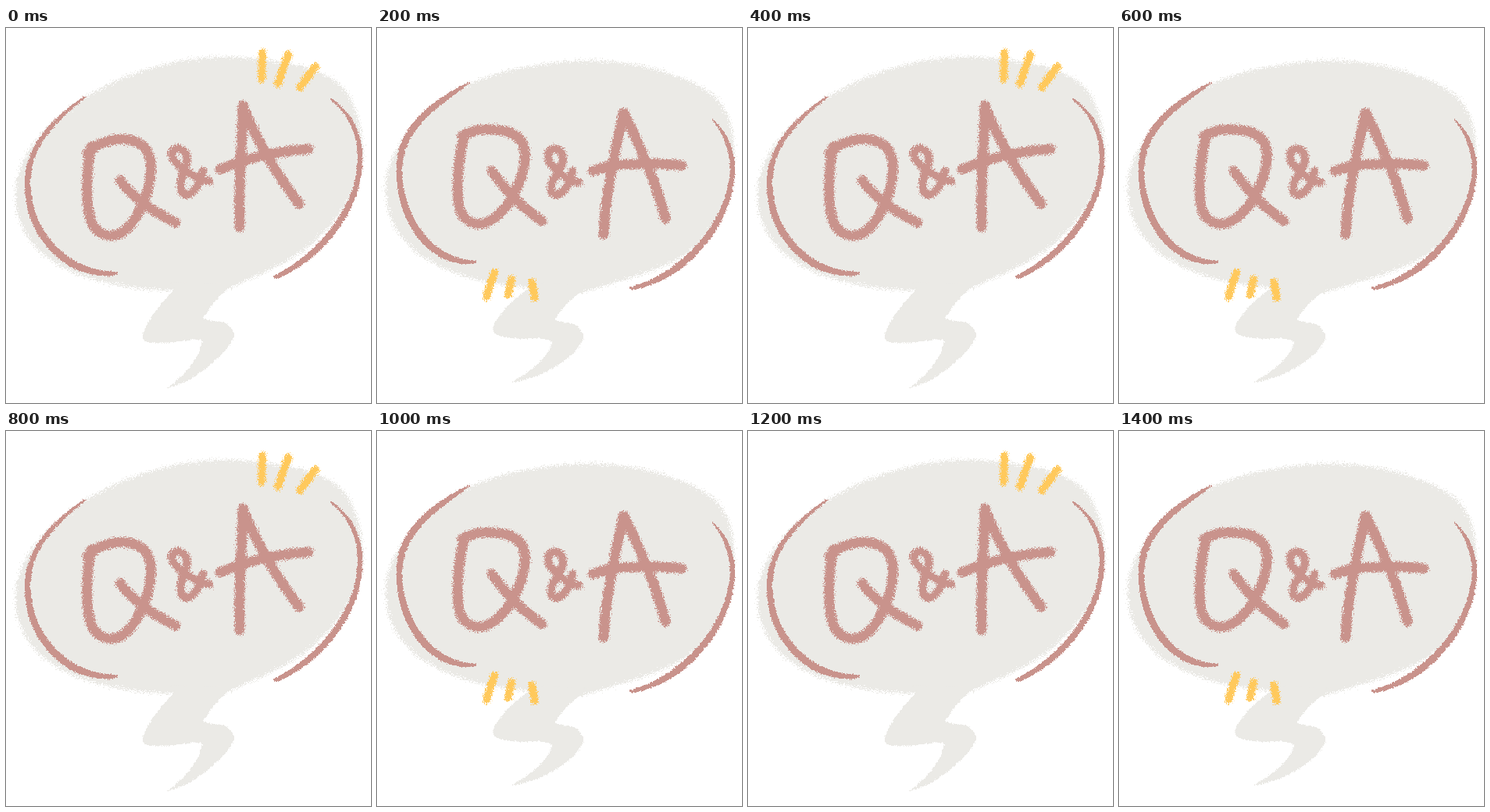
An HTML page for the animation above (1600 ms loop, 467 px wide and 480 px high).

```html
<!DOCTYPE html>
<html lang="en">
<head>
<meta charset="utf-8">
<title>Q&amp;A</title>
<style>
html, body { margin: 0; width: 100%; height: 100%; overflow: hidden; background: #fff; }
svg { display: block; width: 100%; height: 100%; }
.paper { fill: #ebeae6; }
.ink, .arc, .spark { fill: none; stroke: #c9938c; stroke-linecap: round; stroke-linejoin: round; }
.ink { stroke-width: 13; }
.amp { stroke-width: 10.5; }
.arc { fill: #c9938c; stroke-width: 2.6; }
.spark { stroke: #ffc95c; stroke-width: 10; }
.paper.body { filter: url(#ragged); }
.tail { filter: url(#crisp); }
.ink, .spark { filter: url(#chalk); }
.arc { filter: url(#crisp); }
</style>
</head>
<body>
<svg viewBox="0 0 467 480" role="img" aria-label="Q&amp;A">
  <defs id="defs"></defs>
  <g id="tiltUp">
    <path class="paper body" d="M12 215C12 165 48 123 100 90C148 58 218 37 280 37C345 38 413 50 435 81C447 98 455 125 457 155C457 198 432 241 390 278C358 303 322 316 288 332L215 336C155 335 95 324 54 295C23 270 12 244 12 215Z"/>
    <path class="paper tail" d="M210 325L296 327C276 337 264 353 252 371C262 378 272 373 281 378C287 382 292 387 292 393C288 407 275 419 262 430C246 445 227 455 205 462C230 444 248 422 251 401C249 396 239 400 228 400C210 403 186 406 177 400C171 394 180 379 187 369C195 356 205 345 216 335Z"/>
    <path class="arc" d="M101 88C60 116 25 150 25 200C25 262 70 320 137 316L142 313C80 314 31 262 30 200C29 152 62 120 101 88Z"/>
    <path class="arc" d="M416 91C442 110 456 135 455 170C453 235 404 296 346 320L343 318C400 291 449 229 451 170C452 135 440 111 416 91Z"/>
    <path class="ink" d="M104 161C120 143 146 139 164 145C181 150 187 166 185 185C183 213 169 246 151 260C135 272 117 265 109 248C102 227 102 183 109 152M146 195C164 220 190 236 217 249"/>
    <path class="ink amp" d="M260 196C241 192 222 179 214 168C208 157 217 153 223 155C232 159 234 168 229 178C224 191 221 203 226 211C233 217 241 209 245 201C248 194 250 188 252 183"/>
    <path class="ink" d="M303 99C302 150 297 203 299 255M303 100C318 138 346 188 375 225M274 181C300 170 340 158 387 155"/>
    <path class="spark" d="M328 32L327 65M361 34L348 71M396 49L376 76"/>
  </g>
  <g id="tiltDown">
    <path class="paper body" d="M11 205C11 158 52 111 104 78C150 54 214 42 274 42C330 42 382 56 423 81C446 96 454 119 457 150C459 207 441 252 402 285C364 312 310 323 262 339L190 332C142 329 86 315 49 286C22 263 11 236 11 205Z"/>
    <path class="paper tail" d="M187 325L280 330C255 338 240 353 228 373C238 379 247 375 255 381C260 385 264 391 264 397C260 410 248 419 238 427C220 441 194 450 172 454C195 440 218 423 224 403C221 397 211 398 200 397C180 399 157 397 150 390C144 382 156 370 164 360C172 350 183 341 194 334Z"/>
    <path class="arc" d="M118 70C70 94 26 127 26 180C25 245 64 304 121 301L126 299C71 298 31 244 31 180C31 132 75 100 118 70Z"/>
    <path class="arc" d="M430 118C448 136 457 158 457 183C454 252 395 323 328 334L324 333C391 315 449 249 453 183C453 158 446 137 430 118Z"/>
    <path class="ink" d="M109 139C125 127 151 128 170 134C187 140 191 154 189 170C186 197 170 230 149 244C132 256 114 251 107 235C100 213 103 171 112 137M147 183C164 207 188 231 211 247"/>
    <path class="ink amp" d="M258 198C241 194 226 181 220 170C216 159 224 153 231 155C238 159 240 168 235 179C227 191 219 203 224 211C231 217 240 209 244 201C247 195 249 188 250 183"/>
    <path class="ink" d="M315 109C305 158 292 212 290 264M316 109C336 151 357 196 369 244M276 183C307 172 350 172 390 176"/>
    <path class="spark" d="M150 313L140 344M172 322L168 341M198 325L202 345"/>
  </g>
</svg>
<script>
const $ = id => document.getElementById(id);

// Rough brush edges: shift pixels by fine noise; hard edges also cut the alpha.
const brush = (id, grain, scale, hard) => `
  <filter id="${id}" filterUnits="userSpaceOnUse" x="0" y="0" width="467" height="480"
      color-interpolation-filters="sRGB">
    <feTurbulence type="fractalNoise" baseFrequency="${grain}" numOctaves="2" seed="4"/>
    <feDisplacementMap in="SourceGraphic" scale="${scale}" xChannelSelector="R" yChannelSelector="G"/>
    ${hard ? '<feComponentTransfer><feFuncA type="discrete" tableValues="0 1"/></feComponentTransfer>' : ''}
  </filter>`;

$('defs').innerHTML =
  brush('ragged', 0.6, 17, true) +
  brush('crisp', 0.6, 4, true) +
  brush('chalk', 0.6, 10, false);

function draw(now) {
  const down = Math.floor(now / 200) % 2 === 1;
  $('tiltUp').style.display = down ? 'none' : '';
  $('tiltDown').style.display = down ? '' : 'none';
}

const start = performance.now();
function tick() {
  draw(performance.now() - start);
  requestAnimationFrame(tick);
}
tick();
</script>
</body>
</html>
```
